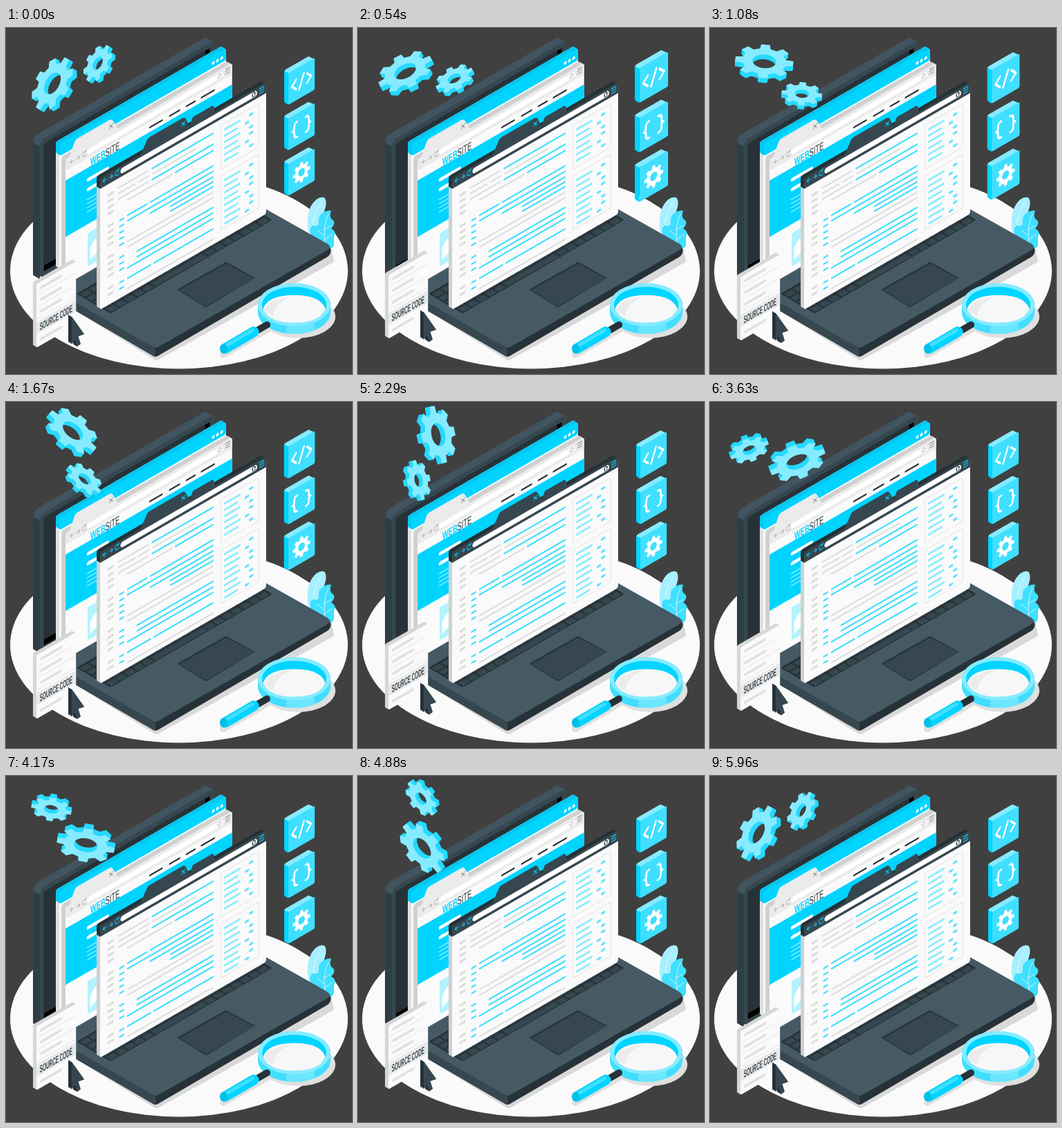
Recreate the animation shown at these times as an HTML page. Size 500 by 500 pixels, loop 6 s.

```html
<!DOCTYPE html>
<html lang="en">
<head>
<meta charset="utf-8">
<title>Source code</title>
<style>
html, body { margin: 0; width: 100%; height: 100%; overflow: hidden; background: #404040; }
svg { display: block; width: 100vw; height: 100vh; }
text { font-family: "Liberation Sans", Arial, sans-serif; }
</style>
</head>
<body>
<svg id="stage" viewBox="0 0 500 500"></svg>
<script>
const CYAN = '#00d4ff', MID = '#40dfff', PALE = '#86ebff', WHITE = '#fafafa', GREY = '#e0e0e0';
const NIGHT = '#263238', SLATE = '#37474f', STEEL = '#455a64', EDGE = '#d0d0d0';

// Isometric planes: upright wall and floor
const wall = (x, y, body) => `<g transform="matrix(.866 -.5 0 1 ${x} ${y})">${body}</g>`;
const floor = (x, y, body) => `<g transform="matrix(.866 -.5 .866 .5 ${x} ${y})">${body}</g>`;
const at = (x, y, body) => `<g transform="translate(${x} ${y})">${body}</g>`;
const rect = (x, y, w, h, fill, r = 0) =>
  `<rect x="${x}" y="${y}" width="${w}" height="${h}" rx="${r}" fill="${fill}"/>`;
const path = (d, fill) => `<path d="${d}" fill="${fill}" fill-rule="evenodd"/>`;
const line = (d, color, w = 2.4) =>
  `<path d="${d}" fill="none" stroke="${color}" stroke-width="${w}" stroke-linecap="round" stroke-linejoin="round"/>`;
const dash = (v, a, b, color, w) => line(`M${a} ${v}H${b}`, color, w);
const oval = (x, y, rx, ry, fill) => `<ellipse cx="${x}" cy="${y}" rx="${rx}" ry="${ry}" fill="${fill}"/>`;
const times = (n, f) => Array.from({ length: n }, (_, i) => f(i)).join('');

// Upright slab: the shape repeated behind in the side colour, then its face.
// A negative depth shows the right side instead of the left.
function slab(x, y, depth, side, face, shape) {
  const n = Math.ceil(Math.abs(depth) * 1.5);
  return times(n, i => {
    const k = depth * (1 - i / n);
    return wall(x - k, y - k * .577, shape(side));
  }) + wall(x, y, shape(face));
}

function gear(r, hole) {
  const pts = [];
  for (let i = 0; i < 8; i++)
    for (const [off, k] of [[-.24, .76], [-.15, 1], [.15, 1], [.24, .76]]) {
      const a = i * Math.PI / 4 + off;
      pts.push((r * k * Math.cos(a)).toFixed(2) + ' ' + (r * k * Math.sin(a)).toFixed(2));
    }
  return `M${pts.join('L')}ZM${hole} 0A${hole} ${hole} 0 1 0 ${-hole} 0A${hole} ${hole} 0 1 0 ${hole} 0Z`;
}

const cross = (x, y, color) => line(`M${x - 2.5} ${y - 2.5}l5 5m0-5l-5 5`, color, 1.2);
const navIcons = (x, y, color) =>
  line(`M${x + 6} ${y}h-6l2.5-2.5m-2.5 2.5l2.5 2.5M${x + 10} ${y}h6l-2.5-2.5m2.5 2.5l-2.5 2.5` +
       `M${x + 26} ${y - 2.5}a3.4 3.4 0 1 0 .6 4m-.4-6.5v2.6h-2.6`, color, 1.1);
const house = (x, y, color) => line(`M${x} ${y}l3-3l3 3m-5 0v3h4v-3`, color, 1.2);
const menu = (x, y, color) => times(3, i => dash(y + i * 3.4, x, x + 7, color, 1.3));

function lid() {
  const top = h => c => rect(0, 0, 292, h, c, 8);
  return slab(49, 163, 10, '#415560', SLATE, top(200)) +
    path('M39 166L49 171V363L39 357Z', '#2f3d45') +
    wall(49, 163, rect(6, 7, 279, 186, NIGHT, 3)) +
    path('M55 343L73 333V341L55 351ZM288 33l6-3v5l-6 4Z', '#000');
}

function base() {
  const keys = times(5, j => times(18, i => j === 0 && i > 4 && i < 11
    ? (i === 5 ? rect(5 * 14.8 + 1.5, -10, 87, 8.6, SLATE, 1) : '')
    : rect(i * 14.8 + 1.5, -10 - j * 11, 12.4, 8.6, SLATE, 1)));
  return path('M96 406L214 479Q217 481 221 479L474 338L470 318Z', '#d9d9d9') +
    path('M58 372L216 458V475Q213 475 211 473L58 384Z', SLATE) +
    path('M216 458L462 314Q469 314 469.5 322Q469 328 464 331L221 473Q218 475 216 475Z', NIGHT) +
    path('M58 372L314 227L463 311Q473 317 463 322L220 461Q216 463 211 460Z', STEEL) +
    floor(152, 412, rect(-1, -57, 270, 57, NIGHT, 3) + keys) +
    path('M247 378L318 338L360 361L289 404Z', '#2a373e') +
    path('M251 379L318 341L359 362L289 402Z', SLATE);
}

function website() {
  const pane = c => rect(0, 0, 278, 182, c, 4);
  const page = rect(0, 0, 278, 17, '#ebebeb', 4) +
    path('M6 1L14-15Q16-20 20-20H73Q77-20 79-16L88 1Z', '#ebebeb') + cross(76, -9.5, '#9a9a9a') +
    navIcons(8, 8.5, '#b5b5b5') + rect(36, 4.5, 227, 8, '#fff', 4) +
    house(254, 8, '#c4c4c4') + menu(267, 4, '#9a9a9a') +
    `<text transform="translate(41.5 30.5) scale(.67 1)" font-size="16" fill="${NIGHT}">` +
    `<tspan font-weight="bold" fill="${CYAN}">WEB</tspan>SITE</text>` +
    [[141, 161], [174, 190], [202, 216], [227, 248]].map(([a, b]) => dash(24.5, a, b, NIGHT, 2.6)).join('') +
    rect(0, 31, 278, 81.5, CYAN) +
    dash(48.5, 38, 70, '#fff', 5) + dash(62.5, 38, 70, '#fff', 5) +
    times(4, i => dash(76.5 + i * 6, 36, 80, '#d6f7ff', .9)) +
    rect(37, 125.5, 70, 48, '#b3f2ff', 2) + path('M41 166.5V150.5Q46 139.5 54 139.5V159.5Z', '#fff');
  return slab(77, 167.5, 5, GREY, WHITE, pane) +
    slab(77, 167.5, 5, '#00c8f0', CYAN, c => rect(0, 0, 278, 18, c, 4)) +
    wall(77, 167.5, [257, 264, 271].map(x => `<circle cx="${x}" cy="11.5" r="2.3" fill="#fff"/>`).join('')) +
    slab(86, 189.5, 6, EDGE, WHITE, pane) + wall(86, 189.5, page);
}

function editor() {
  const G = '#dedede', C = MID;
  const code = [
    [14, 31, 80, G], [14, 87, 188, C], [22, 31, 58, G], [22, 64, 82, G], [22, 88, 158, G],
    [30, 31, 80, G], [30, 87, 188, C], [39, 46, 120, G], [39, 126, 188, C],
    [61, 46, 78, C], [61, 84, 188, C], [69, 46, 188, C], [77, 84, 188, C], [84, 118, 188, C],
    [91, 118, 188, C], [99, 46, 188, G], [107, 46, 188, G], [121, 62, 188, C], [129, 62, 188, C],
    [137, 46, 188, C], [152, 46, 84, C], [152, 90, 188, C], [167, 46, 188, G]
  ];
  const gutter = times(17, i => i % 5 === 4 ? '' : dash(16 + i * 9, 14, 21, G, 4));
  const marks = times(12, i => i === 5 || i === 9 ? '' : dash(62 + i * 9, 33, 39, C, 2.6));
  const panel = (top, h, n) =>
    `<rect x="201" y="${top}" width="64" height="${h}" rx="3" fill="none" stroke="${GREY}"/>` +
    times(n, i => {
      const v = top + 9 + i * 9, s = i % 3 === 1 ? 0 : 7;
      return dash(v, 208, 233 - (i % 2) * 4, PALE, 2.8) + dash(v, 243 + s, 247 + s, '#5ee4ff', 3.4);
    });
  const body = gutter + marks + code.map(c => dash(...c)).join('') + panel(9, 63, 6) + panel(82, 78, 8);
  const bar = path('M66 5L77-11Q79-15 83-15H138Q141-15 143-11L150 5Z', SLATE) +
    path('M147 5L155-8H187Q190-8 192 5Z', SLATE) +
    cross(139, -6, CYAN) + navIcons(5, 10, CYAN) + rect(34, 6.5, 228, 8, '#fff', 4) +
    house(253.5, 10, SLATE) + menu(266, 7, CYAN);
  return slab(136, 217, 5, EDGE, WHITE, c => rect(0, 4, 277, 186, c, 3)) +
    slab(136, 217, 5, NIGHT, SLATE, c => path('M0 15.5V4Q0 0 4 0H273Q277 0 277 4V15.5Z', c)) +
    wall(136, 214, bar) + wall(136, 232.5, body);
}

function plant() {
  return path('M437 295Q433 270 442 255Q451 242 460 245Q465 250 460 265Q456 284 448 300Z', '#a6f0ff') +
    line('M443 291Q445 266 456 250', '#e3fbff', .9) +
    path('M441 302Q437 290 443 285Q451 288 452 282Q450 272 458 267Q465 263 470 264Q466 274 473 278' +
      'Q477 282 470 290Q478 293 474 302L474 314L468 322Z', MID) +
    line('M461 310Q457 288 466 269M459 300l-9-8M459 292l10-6M461 306l10-8', '#d6f8ff', .9);
}

function magnifier() {
  return oval(422, 417, 54, 31, GREY) + line('M314 472L380 434', GREY, 10) +
    path('M364 400a52.5 31 0 0 1 105 0V411a52.5 31 0 0 1 -105 0Z', MID) +
    path('M405 429V441.5Q430 443 446 436V424Q430 432 405 429Z', '#6ae6ff') +
    oval(416.5, 400, 52.5, 31, PALE) + oval(416.5, 400, 46.5, 26, CYAN) +
    path('M371.5 406Q378 386 416.5 386Q455 386 461.5 406Q453 426 416.5 426Q380 426 371.5 406Z', '#f7f7f7') +
    path('M373 408Q380 391 412 388Q388 397 386 417Q376 412 373 408Z', '#ebebeb') +
    line('M365 436L377 429', NIGHT, 10) +
    line('M317 463L358 439', CYAN, 15) + line('M318 459L356 437', MID, 5) +
    oval(314.5, 463.5, 5.5, 7, '#00bfe6');
}

function cube(y, icon) {
  return path(`M402 ${y - 1.5}Q402 ${y - 4} 404 ${y - 5}L437 ${y - 24}L446 ${y - 20}L408 ${y + 1}Z`, PALE) +
    path(`M402 ${y - 3}L408 ${y}V${y + 46}L403 ${y + 43}Q402 ${y + 42} 402 ${y + 40}Z`, CYAN) +
    wall(408, y, rect(0, 0, 44, 46, MID, 2) + at(22, 23, icon));
}

function cubes() {
  const half = line('M-7-11q-5 0-5 5v2q0 4-3 4q3 0 3 4v2q0 5 5 5', '#fff', 3);
  return cube(65, line('M-9-7L-16 0L-9 7M9-7L16 0L9 7M4-10L-4 10', '#fff', 3)) +
    cube(130.7, half + `<g transform="scale(-1 1)">${half}</g>`) +
    cube(196.4, path(gear(14.5, 5.5), '#fff'));
}

function card() {
  const body = [9, 26, 43, 83].map(v => dash(v, 8, 41, GREY, 4)).join('') +
    [17, 34, 51].map(v => dash(v, 1, 65, GREY, .8)).join('') +
    rect(0, 55, 66, 18, '#e9e9e9') +
    `<text transform="translate(5.5 70) scale(.49 1)" font-size="15" font-weight="bold" fill="${SLATE}">SOURCE CODE</text>`;
  return slab(44, 370, 5, '#d6d6d6', WHITE, c => rect(0, 0, 66, 92, c, 2)) + wall(44, 370, body);
}

function pointer() {
  const shape = 'M0 0V40L5 36L9 48L15 47L11 34L21 36Z';
  return slab(95, 417, 5, NIGHT, SLATE, c => path(shape, c));
}

const cog = (x, y, r, hole, depth) =>
  slab(x - depth / 2, y - depth * .29, -depth, '#26d9ff', PALE, c => path(gear(r, hole), c));

const layer = (id, body) => `<g id="${id}">${body}</g>`;
const stage = document.getElementById('stage');
stage.innerHTML = rect(0, 0, 500, 500, '#404040') + oval(250, 351, 244, 141.5, WHITE) +
  plant() + lid() + base() + website() + editor() + magnifier() +
  layer('cubes', cubes()) + layer('card', card()) + layer('pointer', pointer()) +
  layer('gears', cog(70, 82, 34.5, 14, 6) + cog(135, 52.4, 24, 8.5, 5));

const move = (id, t) => document.getElementById(id).setAttribute('transform', t);

// Two beats per loop, the first one falling slowly
function beat(p) {
  if (p < .1) return p / .1;
  if (p < .3) return (.3 - p) / .2;
  return Math.max(0, 1 - Math.abs(p - .5) / .1);
}

function draw() {
  const p = performance.now() % 6000 / 6000;
  const lift = 1 - Math.abs(1 - p * 4 % 1 * 2);
  move('gears', `rotate(${p * 360} 98 73.2)`);
  move('cubes', `translate(424 141) scale(${1 + .1 * beat(p)}) translate(-424 -141)`);
  move('card', `translate(0 ${-18 * lift})`);
  move('pointer', `translate(0 ${-9 * lift})`);
  requestAnimationFrame(draw);
}
draw();
</script>
</body>
</html>
```
